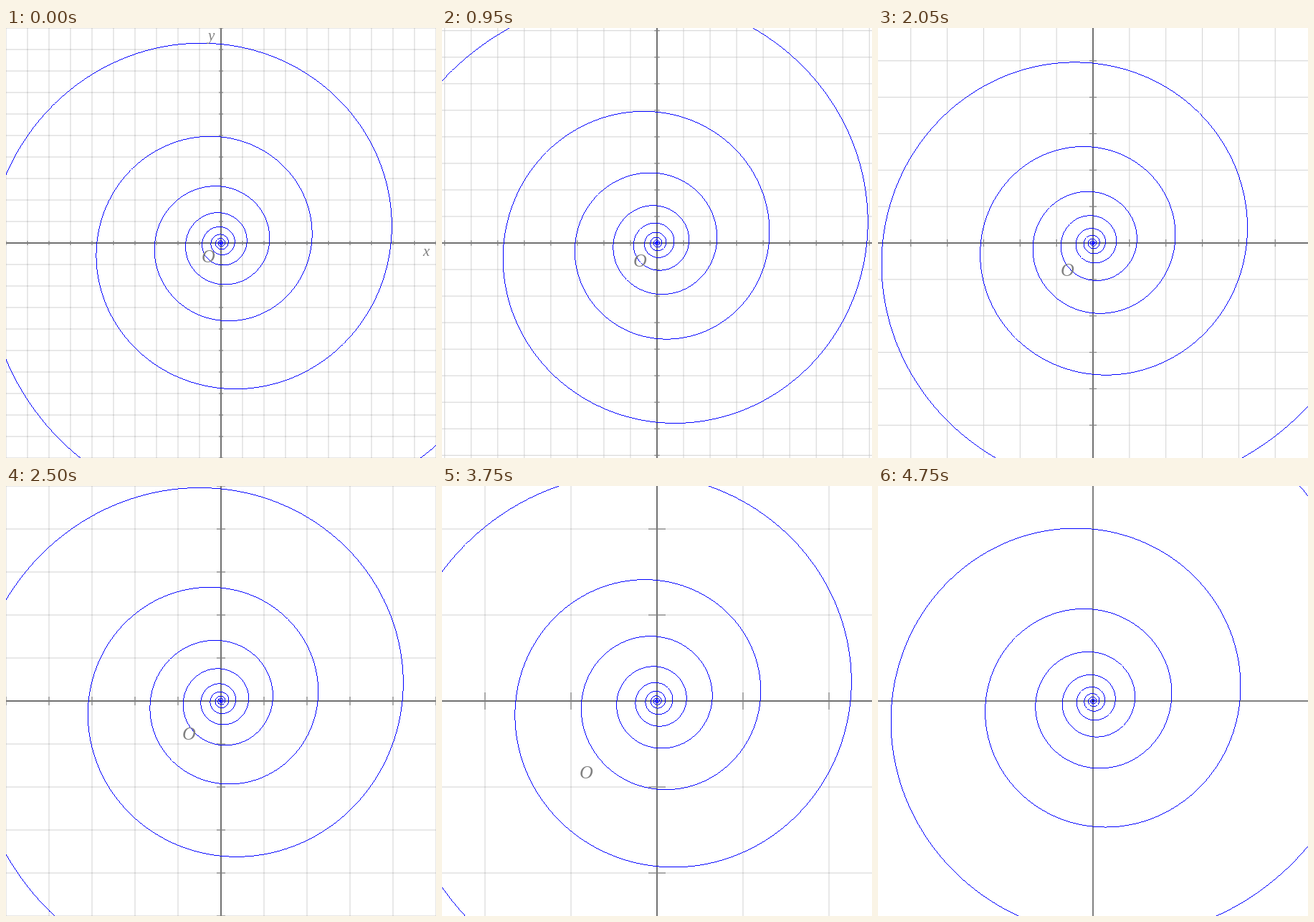
A matplotlib script for the animation above (4800 ms loop, 600 px wide and 600 px high).

```python
import numpy as np
import matplotlib.pyplot as plt
from matplotlib.animation import FuncAnimation

SIZE, MID = 600, 300
FRAMES, STEP_MS = 96, 50
PX = 0.72  # points per pixel at 100 dpi
GRAY = "#808080"

fig = plt.figure(figsize=(6, 6), dpi=100, facecolor="white")
ax = fig.add_axes([0, 0, 1, 1])
ax.axis("off")

# The spiral is a crisp one-pixel line, so it is rasterised on its own layer
spiral = ax.imshow(np.zeros((SIZE, SIZE, 4), np.uint8), aspect="auto",
                   extent=(0, SIZE, SIZE, 0), interpolation="nearest",
                   zorder=3)
ax.set_xlim(0, SIZE)
ax.set_ylim(SIZE, 0)


def line(color, width, z):
    return ax.plot([], [], color=color, lw=width * PX, zorder=z,
                   solid_capstyle="butt", snap=False)[0]


def label(text, px):
    return ax.text(0, 0, text, family="Liberation Serif", style="italic",
                   size=px * PX, color=GRAY, ha="left", va="baseline",
                   zorder=4, clip_on=True)


def crosses(centers, low, high):
    """Vertical then horizontal strokes through each center, as one path."""
    along = np.repeat(centers, 3)
    span = np.tile([low, high, np.nan], len(centers))
    return np.r_[along, span], np.r_[span, along]


grid = line("#d3d3d3", 1, 1)
axes_lines = line("#707070", 2, 2)
ticks = line(GRAY, 1.2, 2)
origin, x_name, y_name = label("O", 26), label("x", 21), label("y", 21)

# Logarithmic spiral r = 1.2 * exp(theta / 10)
theta = np.linspace(-20 * np.pi, 9 * np.pi, 150000)
radius = 1.2 * np.exp(theta / 10)
spiral_x, spiral_y = radius * np.cos(theta), radius * np.sin(theta)


def trace(x, y):
    """One pixel per column where the curve is flat, per row where steep."""
    dx, dy = np.abs(np.diff(x)), np.abs(np.diff(y))
    new_col = np.diff(np.floor(x - 0.5)) != 0
    new_row = np.diff(np.floor(y - 0.5)) != 0
    hit = np.where(dx >= dy, new_col, new_row)
    col = np.floor((x[1:] + x[:-1])[hit] / 2).astype(int)
    row = np.floor((y[1:] + y[:-1])[hit] / 2).astype(int)
    seen = (col >= 0) & (col < SIZE) & (row >= 0) & (row < SIZE)
    image = np.zeros((SIZE, SIZE, 4), np.uint8)
    image[row[seen], col[seen]] = (0, 0, 255, 255)
    return image


def draw(i):
    half = (100 - i) / 10  # visible units on each side of the origin
    s = MID / half
    n = int(half + 1e-9)
    units = np.array([k for k in range(-n, n + 1) if k], dtype=float)
    marks = MID + units * s

    grid.set_data(*crosses(marks, 0, SIZE))
    ticks.set_data(*crosses(marks, MID - 0.1 * s, MID + 0.1 * s))

    # Once no unit mark is in view, only hairline axes remain
    bare = n == 0
    axes_lines.set_color("black" if bare else "#707070")
    axes_lines.set_linewidth((1 if bare else 2) * PX)
    axes_lines.set_data(*crosses(np.array([MID]), 0, SIZE))

    spiral.set_data(trace(MID + s * spiral_x, MID - s * spiral_y))
    origin.set_position((MID - 0.9 * s, MID + 0.9 * s))
    x_name.set_position((MID + 9.4 * s - 1, MID + 0.6 * s))
    y_name.set_position((MID - 0.6 * s, MID - 9.4 * s - 1))
    return grid, ticks, axes_lines, spiral, origin, x_name, y_name


anim = FuncAnimation(fig, draw, frames=FRAMES, interval=STEP_MS,
                     repeat=True, repeat_delay=0, blit=False)
plt.show()
```
